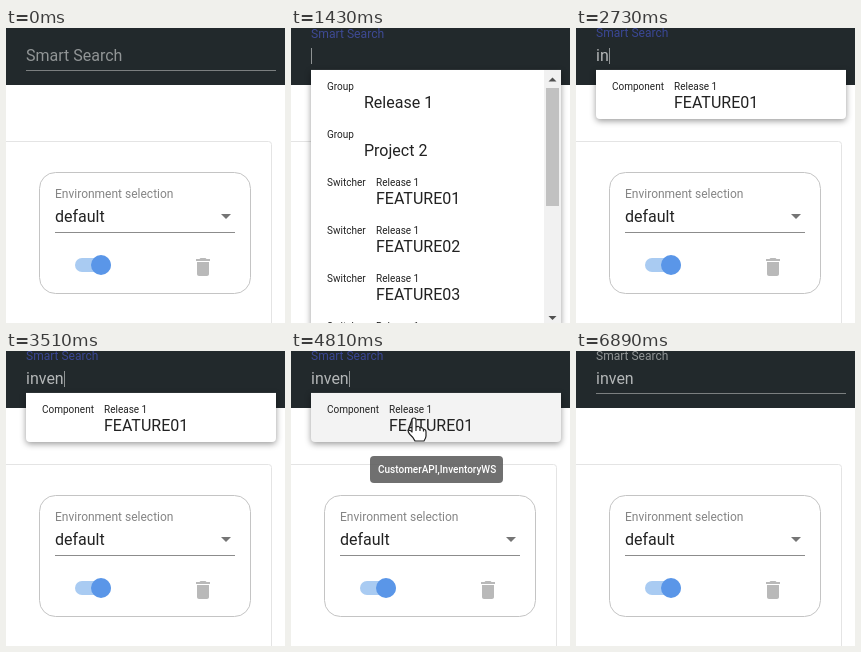
An HTML page that plays this animation: 279x295 px, repeating every 7020 ms.

```html
<!DOCTYPE html>
<html lang="en">
<head>
<meta charset="utf-8">
<title>Smart search</title>
<style>
  html, body { margin: 0; width: 100%; height: 100%; overflow: hidden; background: #fff; }
  svg { display: block; width: 279px; height: 295px; font: 16px Roboto, sans-serif; }
  .small { font-size: 10px; }
  .hint { font-size: 10px; font-weight: 500; fill: #fff; }
  .bubble { fill: #616161; fill-opacity: .9; }
  .panel { filter: drop-shadow(0 2px 3px rgba(0, 0, 0, .4)); }
</style>
</head>
<body>
<svg viewBox="0 0 279 295">
  <rect width="279" height="295" fill="#fff"/>
  <path d="M0 113.5H262.500Q265.500 113.500 265.500 116.500V295" fill="none" stroke="#e4e4e4"/>

  <!-- Environment card -->
  <rect x="33.500" y="144.500" width="211" height="121" rx="16" fill="#fff" stroke="#c4c4c4"/>
  <text x="49" y="170" font-size="12" fill="#858585">Environment selection</text>
  <text x="49" y="194" fill="#222">default</text>
  <path d="M49 204.500H229" stroke="#8c8c8c"/>
  <path d="M215 186h10l-5 5z" fill="#757575"/>
  <rect x="69" y="230" width="36" height="14" rx="7" fill="#a9cbf2"/>
  <circle cx="95" cy="237" r="10" fill="#5a96e8"/>
  <path transform="translate(185 227)" fill="#b9b9b9"
    d="M6 19c0 1.100.9 2 2 2h8c1.100 0 2-.9 2-2V7H6zM19 4h-3.500l-1-1h-5l-1 1H5v2h14z"/>

  <!-- Search field -->
  <rect width="279" height="57" fill="#22292c"/>
  <path d="M20 42.500H270" stroke="#7b7f80"/>
  <path id="hoverLine" d="M20 42.500H270" stroke="#a0a3a4" stroke-width="1.500"/>
  <text id="label">Smart Search</text>
  <text id="query" x="20" y="33" fill="#b4b7b8"></text>
  <path id="caret" stroke="#8f9394"/>

  <g id="fieldHint">
    <rect class="bubble" x="20" y="50" width="250" height="42" rx="4"/>
    <text class="hint" x="28" y="67">Use 'S:' for Switchers, 'G:' for Groups and 'C:' for</text>
    <text class="hint" x="28" y="82">Components</text>
  </g>

  <g id="fullList" class="panel">
    <path d="M20 42H270V298H20z" fill="#fff"/>
    <g id="fullRows"></g>
    <path d="M253 42H270V298H253z" fill="#f1f1f1"/>
    <path d="M255 60H268V178H255z" fill="#c1c1c1"/>
    <path d="M257.500 53.500l4-4 4 4zM257.500 288l4 4 4-4z" fill="#505050"/>
  </g>

  <g id="match" class="panel">
    <path id="matchBack" d="M20 42H270V87Q270 91 266 91H24Q20 91 20 87z"/>
    <g id="matchRow"></g>
  </g>

  <g id="matchHint">
    <rect class="bubble" x="79" y="105" width="133" height="27" rx="4"/>
    <text class="hint" x="87" y="122">CustomerAPI,InventoryWS</text>
  </g>

  <path id="hand" fill="#fff" stroke="#222" stroke-width="1.200" stroke-linejoin="round"
    d="M0 2Q0 0 2 0T4 2V9Q7 7.500 8 10Q10.500 9 11.500 11.500Q14 11 14 14V18Q14 20 12 23H3Q2 20-2 16.500Q-5 13-3 12.500Q-1.500 12 0 14zM4 9v4M8 10v3M11.500 11.500v2"/>
  <path id="arrow" d="M0 0V16l4-4 3 6 3-1-3-6h5z" fill="#fff" stroke="#222" stroke-width=".8"/>
</svg>
<script>
const LOOP = 7020, STEP = 130;
const $ = id => document.getElementById(id);
const clamp = v => Math.max(0, Math.min(1, v));
const ramp = (t, start, length) => clamp((t - start) / length);
const easeOut = p => 1 - (1 - p) ** 3;
const within = (t, ...spans) => spans.some(([from, to]) => t >= from && t < to);
const show = (id, visible) => $(id).style.opacity = +visible;

const row = (index, kind, title, x, group = '') => {
  const y = 62 + index * 48;
  return `<text class="small" x="36" y="${y}" fill="#222">${kind}</text>
    <text class="small" x="${x}" y="${y}" fill="#222">${group}</text>
    <text x="${x}" y="${y + 18}" fill="#222">${title}</text>`;
};
$('fullRows').innerHTML = row(0, 'Group', 'Release 1', 73) + row(1, 'Group', 'Project 2', 73) +
  [1, 2, 3, 4].map(n => row(n + 1, 'Switcher', 'FEATURE0' + n, 85, 'Release 1')).join('');
$('matchRow').innerHTML = row(0, 'Component', 'FEATURE01', 98, 'Release 1');

const keyTimes = [2470, 2730, 2990, 3380, 3510];

// Pops from the given centre while fading in, then fades out.
function hint(id, cx, cy, t, start, end) {
  const p = easeOut(ramp(t, start, 200));
  const scale = p < .5 ? p * 1.98 : .98 + p * .02;
  $(id).setAttribute('transform', `translate(${cx} ${cy}) scale(${scale}) translate(${-cx} ${-cy})`);
  show(id, p * (1 - ramp(t, end, 200)));
}

function drawField(t) {
  const lift = easeOut(ramp(t, 1170, 400));
  const blur = ramp(t, 6500, 390);
  const focus = lift * (1 - blur);
  const mix = (grey, blue) => Math.round(grey + (blue - grey) * focus);
  $('label').setAttribute('transform', `translate(20 ${33 - 24 * lift}) scale(${1 - .25 * lift})`);
  $('label').setAttribute('fill', `rgb(${mix(145, 58)},${mix(149, 71)},${mix(150, 148)})`);
  show('hoverLine', ramp(t, 390, 600) * .5 * (1 - ramp(t, 6630, 260)));

  $('query').textContent = 'inven'.slice(0, keyTimes.filter(k => t >= k).length);
  const x = Math.round(20 + $('query').getComputedTextLength()) + .5;
  $('caret').setAttribute('d', `M${x} 20V36`);
  show('caret', within(t, [1300, 1820], [2470, 3900], [4420, 4940], [5590, 5980]));
}

function drawPointer(t) {
  const leave = ramp(t, 5850, 260);
  const x = 121 + 154 * leave, y = 67 - 29 * leave;
  $('hand').setAttribute('transform', `translate(${x} ${y})`);
  $('arrow').setAttribute('transform', `translate(${x} ${y})`);
  show('hand', within(t, [4680, 6110]));
  show('arrow', within(t, [6110, 6240]));
}

function draw(now) {
  const t = Math.floor(now % LOOP / STEP) * STEP;
  drawField(t);
  hint('fieldHint', 145, 50, t, 650, 1200);
  const open = ramp(t, 1200, 200);
  $('fullList').setAttribute('transform', `translate(0 42) scale(1 ${.8 + .2 * open}) translate(0 -42)`);
  show('fullList', t < 2730 ? open : 0);
  show('match', within(t, [2730, 6630]));
  $('matchBack').setAttribute('fill', within(t, [4680, 6110]) ? '#f3f3f3' : '#fff');
  hint('matchHint', 145, 105, t, 4550, 6140);
  drawPointer(t);
}

const origin = performance.now();
function tick() {
  draw(performance.now() - origin);
  requestAnimationFrame(tick);
}
tick();
</script>
</body>
</html>
```
